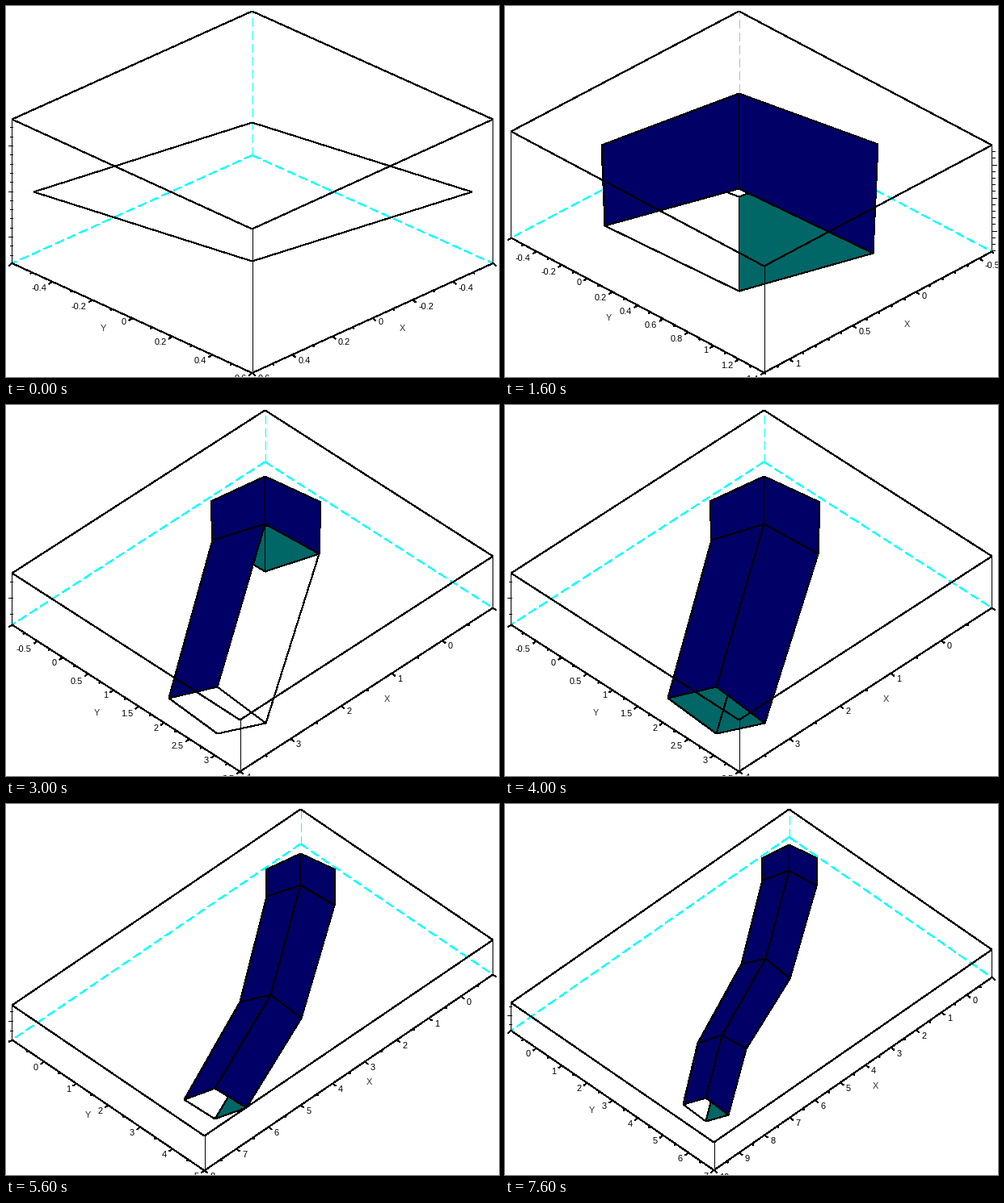
Animation of 610 by 460 pixels, one loop 8000 ms. Source, as a matplotlib script:

```python
import math
from collections import namedtuple

import matplotlib.pyplot as plt
from matplotlib.animation import FuncAnimation

W, H, DPI = 610, 460, 80
PX = 72 / DPI
LEFT_X, RIGHT_X = 7, 602
OUTSIDE, INSIDE = "#000066", "#006666"
CYAN, GRAY = "#00ffff", "#bbbbbb"

plt.rcParams["font.family"] = "Liberation Sans"

# Box corners are given on the lid; axes are (low, high, step, subdivisions).
# zticks are (side x, reference y, spacing, ticks per major one).
# Each ring lists its left, back, right and front corner.
View = namedtuple(
    "View", "back left right front height xaxis yaxis zticks xname yname post rings")

START = View(
    (304, 6), 140, 140, (304, 276), 178.5,
    (-0.6, 0.6, 0.2, 2), (-0.6, 0.6, 0.2, 2), (LEFT_X, 229, 11.3, 5),
    (490, 399), (120, 399), CYAN,
    [[(34, 230), (304, 144), (576, 230), (304, 316)]])

VIEWS = [
    View((289, 6), 155, 172, (320, 322), 132,
         (-0.6, 1.2, 0.5, 5), (-0.6, 1.4, 0.2, 2), (RIGHT_X, 237, 8.2, 5),
         (497, 394), (128, 386), GRAY,
         [[(119, 172), (289, 108), (461, 171), (289, 236)],
          [(123, 272), (289, 226), (455, 306), (289, 353)]]),
    View((320, 6), 208, 187, (289, 390), 64,
         (-1, 4, 1, 2), (-1, 3.5, 0.5, 2), (LEFT_X, 238, 20, 2),
         (471, 364), (112, 381), CYAN,
         [[(253, 119), (320, 88), (389, 120), (320, 150)],
          [(255, 167), (320, 147), (387, 184), (320, 206)],
          [(201, 363), (261, 349), (321, 394), (261, 407)]]),
    View((364, 6), 249, 168, (245, 411), 43,
         (-1, 8, 1, 2), (-1, 5, 1, 2), (LEFT_X, 268, 12, 2),
         (449, 344), (101, 385), CYAN,
         [[(321, 81), (364, 61), (407, 81), (364, 100)],
          [(322, 114), (364, 100), (406, 125), (364, 138)],
          [(289, 245), (327, 236), (365, 265), (327, 275)],
          [(220, 366), (258, 352), (297, 376), (258, 390)]]),
    View((351, 6), 246, 180, (258, 419), 34.5,
         (-1, 10, 1, 2), (-1, 7, 1, 2), (LEFT_X, 261, 11, 2),
         (458, 349), (107, 379), CYAN,
         [[(317, 67), (351, 50), (386, 67), (351, 82)],
          [(318, 94), (351, 82), (385, 101), (351, 113)],
          [(292, 198), (322, 191), (352, 216), (322, 223)],
          [(238, 296), (268, 286), (298, 303), (268, 315)],
          [(220, 372), (248, 364), (276, 385), (248, 393)]]),
]

EDGE_STEPS = (2, 3, 5, 7)   # step at which each side edge appears
FACE_STEPS = (4, 6, 8, 9)   # step at which each side face appears
COMPLETE = 9

fig = plt.figure(figsize=(W / DPI, H / DPI), dpi=DPI, facecolor="white")
ax = fig.add_axes([0, 0, 1, 1])
ax.axis("off")
ax.set_xlim(0, W)
ax.set_ylim(H, 0)


def line(*points, color="black", dashed=False):
    xs, ys = zip(*points)
    ax.plot([x + 0.5 for x in xs], [y + 0.5 for y in ys], color=color, lw=PX,
            ls=(0, (10, 5)) if dashed else "-", antialiased=False,
            solid_capstyle="butt", zorder=len(ax.get_children()))


def face(points, color):
    ax.add_patch(plt.Polygon([(x + 0.5, y + 0.5) for x, y in points],
                             facecolor=color, edgecolor="black", lw=PX,
                             antialiased=False, zorder=len(ax.get_children())))


def label(x, y, text, align="center", color="black"):
    ax.text(x, y, text, size=11 * PX, ha=align, va="center_baseline",
            color=color, zorder=1000)


def down(point, height):
    return point[0], point[1] + height


def draw_axis(low_end, high_end, axis, side):
    """Ticks and numbers along a floor edge; side is -1 (left) or 1 (right)."""
    low, high, step, parts = axis
    minor = step / parts
    dx, dy = high_end[0] - low_end[0], high_end[1] - low_end[1]
    slope = abs(dy / dx)
    for k in range(math.ceil(low / minor - 1e-6), math.floor(high / minor + 1e-6) + 1):
        value = round(k * minor, 3) + 0.0
        t = (value - low) / (high - low)
        x, y = low_end[0] + t * dx, low_end[1] + t * dy
        major = k % parts == 0
        size = 1 if major else 0.5
        line((x, y), (x + side * 4 * size, y + 3 * size))
        if major and value > low:
            text = f"{value:g}"
            label(x + side * 7 + 0.5, y + 1.15 * len(text) + 11 * slope - 1.7,
                  text, "right" if side < 0 else "left")


def draw_z_ticks(view):
    x, middle, gap, parts = view.zticks
    top = view.left if x == LEFT_X else view.right
    side = -1 if x == LEFT_X else 1
    for k in range(-10, 11):
        y = middle + k * gap
        if top <= y <= top + view.height:
            line((x, y), (x + side * (5 if k % parts == 0 else 3), y))


def draw_segment(upper, lower, step):
    for i, shown_from in enumerate(EDGE_STEPS):
        if step >= shown_from:
            line(upper[i], lower[i])
    # The two far sides show their inside and lie under the near ones.
    for i in (3, 2, 0, 1):
        if step >= FACE_STEPS[i]:
            j = (i + 1) % 4
            face([upper[i], upper[j], lower[j], lower[i]],
                 OUTSIDE if i < 2 else INSIDE)


def draw_scene(view, step):
    h = view.height
    left, right = (LEFT_X, view.left), (RIGHT_X, view.right)
    back, front = view.back, view.front

    line(down(back, h), back, color=view.post, dashed=True)
    line(down(back, h), down(left, h), color=CYAN, dashed=True)
    line(down(back, h), down(right, h), color=CYAN, dashed=True)

    last = len(view.rings) - 2
    for ring in view.rings:
        line(*ring, ring[0])
    for i, pair in enumerate(zip(view.rings, view.rings[1:])):
        draw_segment(*pair, step if i == last else COMPLETE)

    line(back, left, front, right, back)
    line(left, down(left, h), down(front, h), down(right, h), right)
    line(front, down(front, h))
    draw_axis(down(left, h), down(front, h), view.yaxis, -1)
    draw_axis(down(right, h), down(front, h), view.xaxis, 1)
    draw_z_ticks(view)
    label(*view.xname, "X", color="#333333")
    label(*view.yname, "Y", color="#333333")


def update(frame):
    for artist in [*ax.lines, *ax.patches, *ax.texts]:
        artist.remove()
    cycle, step = divmod(frame, 10)
    step = min(step, 8)
    if step:
        draw_scene(VIEWS[cycle], step)
    elif cycle:
        draw_scene(VIEWS[cycle - 1], COMPLETE)
    else:
        draw_scene(START, 0)
    return []


anim = FuncAnimation(fig, update, frames=40, interval=200, repeat=True,
                     repeat_delay=0, init_func=lambda: [])
plt.show()
```
